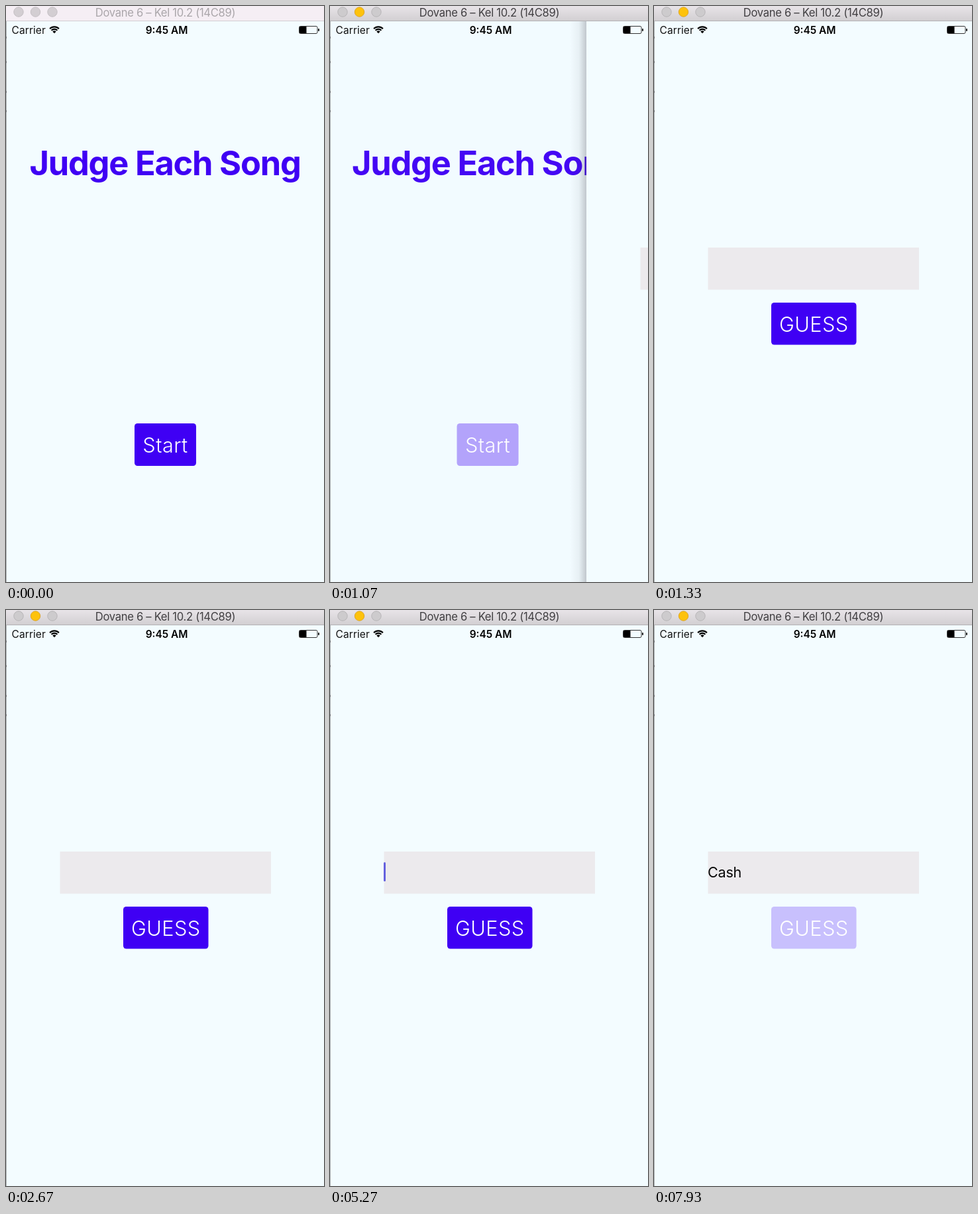
Write an HTML page with a canvas that moves like this. It is 480 by 868 pixels and loops after 8 s.

```html
<!DOCTYPE html>
<html lang="en">
<head>
<meta charset="utf-8">
<title>Judge Each Song</title>
<style>
  html, body { margin: 0; width: 100%; height: 100%; overflow: hidden; background: #f3fcff; }
  canvas { display: block; width: 480px; height: 868px; }
</style>
</head>
<body>
<canvas id="stage" width="480" height="868"></canvas>
<script>
const ctx = document.getElementById('stage').getContext('2d');
const W = 480, H = 868, LOOP = 8000, BAR = 23;
const PAPER = '#f3fcff', ACCENT = '#3f00f4';
const FONT = 'Inter, Roboto, "Open Sans", sans-serif';
const WORD = 'Cash';
const KEY_TIMES = [6330, 6610, 6820, 7010];

const clamp = v => Math.max(0, Math.min(1, v));
const ramp = (t, from, length) => clamp((t - from) / length);

// Symmetric ease built from a power-curve half
function easeInOut(t, power) {
  return t < 0.5 ? Math.pow(2 * t, power) / 2 : 1 - Math.pow(2 - 2 * t, power) / 2;
}

function rect(x, y, w, h, color) {
  ctx.fillStyle = color;
  ctx.fillRect(x, y, w, h);
}

function roundBox(x, y, w, h, r) {
  ctx.beginPath();
  ctx.roundRect(x, y, w, h, r);
}

function label(text, x, y, size, weight, color, align = 'left', spacing = 0) {
  ctx.font = `${weight} ${size}px ${FONT}`;
  ctx.letterSpacing = spacing + 'px';
  ctx.textAlign = align;
  ctx.textBaseline = 'alphabetic';
  ctx.fillStyle = color;
  ctx.fillText(text, x, y);
}

function button(text, x, y, w, h, opacity) {
  ctx.save();
  ctx.globalAlpha *= opacity;
  roundBox(x, y, w, h, 4.5);
  ctx.fillStyle = ACCENT;
  ctx.fill();
  ctx.restore();
  label(text, x + w / 2, y + 44, 30.7, 300, '#fff', 'center', 0.4);
}

function lamp(x, fill, edge) {
  ctx.beginPath();
  ctx.arc(x, 9, 7.2, 0, Math.PI * 2);
  ctx.fillStyle = fill;
  ctx.fill();
  ctx.lineWidth = 1;
  ctx.strokeStyle = edge;
  ctx.stroke();
}

function titleBar(active) {
  if (active) {
    const shade = ctx.createLinearGradient(0, 0, 0, 22);
    shade.addColorStop(0, '#e8e4e8');
    shade.addColorStop(1, '#d2cfd2');
    rect(0, 0, W, 22, shade);
  } else {
    rect(0, 0, W, 22, '#f5eef4');
  }
  rect(0, 22, W, 1, active ? '#b3b1b4' : '#d2cdd2');
  const gray = active ? '#cdcbcd' : '#d3ced2';
  const edge = active ? '#b7b5b7' : '#c4bfc3';
  lamp(19, gray, edge);
  lamp(44.5, active ? '#fdc20c' : gray, active ? '#dda526' : edge);
  lamp(70, gray, edge);
  label('Dovane 6 – Kel 10.2 (14C89)', 240.5, 15.5, 16.6, 400,
    active ? '#413f42' : '#aaa6aa', 'center', -0.3);
}

function statusBar() {
  label('Carrier', 8.5, 42, 15.5, 400, '#111', 'left', 0.1);
  label('9:45 AM', 242.5, 42, 15.4, 600, '#000', 'center');

  const from = -Math.PI * 0.75, to = -Math.PI * 0.25;
  ctx.strokeStyle = ctx.fillStyle = '#000';
  ctx.lineWidth = 2.1;
  for (const r of [9.8, 6.3]) {
    ctx.beginPath();
    ctx.arc(73, 41.2, r, from, to);
    ctx.stroke();
  }
  ctx.beginPath();
  ctx.moveTo(73, 41.2);
  ctx.arc(73, 41.2, 3.8, from, to);
  ctx.fill();

  roundBox(442.5, 30.5, 27.5, 11, 2);
  ctx.lineWidth = 1;
  ctx.strokeStyle = '#333';
  ctx.stroke();
  rect(443, 31, 10.5, 10, '#000');
  roundBox(471, 34, 2, 4, 1);
  ctx.fillStyle = '#222';
  ctx.fill();
}

function welcome(opacity) {
  rect(0, BAR, W + 20, H - BAR, PAPER);
  label('Judge Each Song', 240, 254.5, 50.5, 700, ACCENT, 'center', -1.2);
  button('Start', 194, 629, 93, 64, opacity);
}

function cursorOpacity(t) {
  if (t < 1870) return 0;
  const last = KEY_TIMES.filter(k => k <= t).pop();
  const phase = (t - (last || 1870)) % 1000;
  const rise = last && t - last < 1000 ? 1 : clamp(0.55 + phase / 150);
  return Math.min(rise, 1 - ramp(phase, 480, 120));
}

function quiz(t) {
  rect(0, BAR, W, H - BAR, PAPER);
  rect(81.5, 364, 318.5, 63.5, '#eceaed');
  const typed = WORD.slice(0, KEY_TIMES.filter(k => k <= t).length);
  label(typed, 81, 403, 21.6, 400, '#080808', 'left', -0.25);
  const end = ctx.measureText(typed).width;
  ctx.save();
  ctx.globalAlpha = 0.9 * cursorOpacity(t);
  roundBox(81 + end, 380, 3, 29, 1.5);
  ctx.fillStyle = '#5552dc';
  ctx.fill();
  ctx.restore();
  button('GUESS', 177, 447, 128.5, 63.5, 1 - 0.76 * ramp(t, 7720, 160));
}

function pageShadow() {
  const blur = ctx.createLinearGradient(-25, 0, 0, 0);
  blur.addColorStop(0, 'rgba(60,60,70,0)');
  blur.addColorStop(0.55, 'rgba(60,60,70,0.06)');
  blur.addColorStop(1, 'rgba(60,60,70,0.27)');
  rect(-25, BAR, 25, H - BAR, blur);
}

function windowEdge() {
  rect(0, BAR, 1, H - BAR, '#adb2b5');
  for (const y of [46, 83, 128, 157]) rect(0, y, 1, 3, '#75787c');
}

function draw(t) {
  const slide = easeInOut(ramp(t, 1000, 250), 1.68);
  const release = easeInOut(ramp(t, 1000, 250), 2);
  rect(0, 0, W, H, '#e9e9ef');

  if (slide < 1) {
    ctx.save();
    ctx.globalAlpha = 1 - 0.15 * slide;
    ctx.translate(-12.8 * slide, 0);
    welcome(1 - 0.76 * ramp(t, 590, 140) * (1 - release));
    ctx.restore();
  }
  if (slide > 0) {
    ctx.save();
    ctx.translate(Math.round(W * (1 - slide)), 0);
    if (slide < 1) pageShadow();
    quiz(t);
    ctx.restore();
  }

  statusBar();
  windowEdge();
  titleBar(t >= 870);
}

const start = performance.now();
function tick() {
  draw((performance.now() - start) % LOOP);
  requestAnimationFrame(tick);
}
tick();
</script>
</body>
</html>
```
